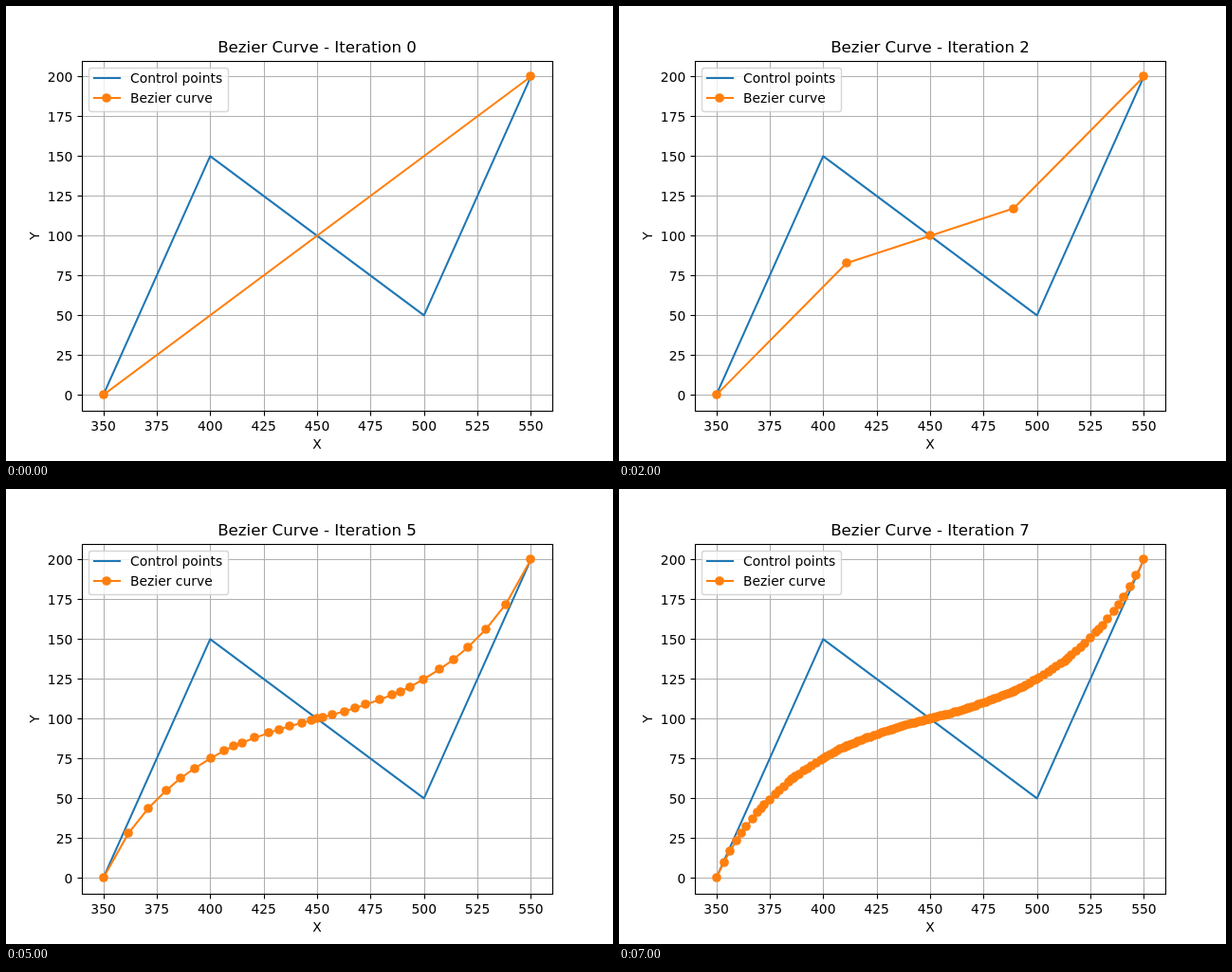
These frames come from a looping animation (640x480 px, 8000 ms). An HTML page with a canvas:

```html
<!DOCTYPE html>
<html lang="en">
<head>
<meta charset="utf-8">
<title>Bezier Curve</title>
<style>
  html, body { margin: 0; width: 100%; height: 100%; overflow: hidden; background: #fff; }
  canvas { display: block; }
</style>
</head>
<body>
<canvas id="stage" width="640" height="480"></canvas>
<script>
const ctx = document.getElementById('stage').getContext('2d');

const PT = 100 / 72;
const BLUE = '#1f77b4', ORANGE = '#ff7f0e', GRID = '#b0b0b0';
const AXES = { left: 80.5, right: 576.5, top: 58.5, bottom: 427.5 };
const CONTROL = [[350, 0], [400, 150], [500, 50], [550, 200]];
const STEPS = 8, STEP_MS = 1000;

const toX = x => 80 + (x - 340) * 496 / 220;
const toY = y => 427.2 - (y + 10) * 1.68;
const snap = v => Math.round(v) + 0.5;
const project = ([x, y]) => [toX(x), toY(y)];
const ticks = start => Array.from({ length: 9 }, (_, i) => start + 25 * i);

const midpoints = pts => pts.slice(1).map((p, i) =>
  [(p[0] + pts[i][0]) / 2, (p[1] + pts[i][1]) / 2]);

// Each half keeps the split point twice, so its degree grows by one per level.
function split(pts) {
  const left = [], right = [];
  let level = pts;
  while (level.length) {
    left.push(level[0]);
    right.unshift(level[level.length - 1]);
    level = midpoints(level);
  }
  const mid = right[0];
  return { left: [...left, mid], mid, right: [mid, ...right] };
}

function innerPoints(pts, depth) {
  if (depth === 0) return [];
  const { left, mid, right } = split(pts);
  return [...innerPoints(left, depth - 1), mid, ...innerPoints(right, depth - 1)];
}

const curves = Array.from({ length: STEPS }, (_, depth) =>
  [CONTROL[0], ...innerPoints(CONTROL, depth), CONTROL[3]].map(project));
const controlLine = CONTROL.map(project);

function line(pts, color, width, cap = 'butt') {
  ctx.beginPath();
  pts.forEach(([x, y]) => ctx.lineTo(x, y));
  ctx.strokeStyle = color;
  ctx.lineWidth = width * PT;
  ctx.lineCap = cap;
  ctx.lineJoin = 'round';
  ctx.stroke();
}

function marker([x, y]) {
  ctx.beginPath();
  ctx.arc(Math.round(x), Math.round(y), 3.5 * PT, 0, 2 * Math.PI);
  ctx.fillStyle = ORANGE;
  ctx.fill();
}

function text(str, x, y, align = 'center', size = 10) {
  ctx.font = `${size * PT}px "DejaVu Sans", sans-serif`;
  ctx.textAlign = align;
  ctx.fillStyle = '#000';
  ctx.fillText(str, x, y);
}

function drawGrid() {
  for (const v of ticks(350)) {
    const x = snap(toX(v));
    line([[x, AXES.top], [x, AXES.bottom]], GRID, 0.8, 'square');
  }
  for (const v of ticks(0)) {
    const y = snap(toY(v));
    line([[AXES.left, y], [AXES.right, y]], GRID, 0.8, 'square');
  }
}

function drawAxes() {
  const { left, right, top, bottom } = AXES;
  for (const v of ticks(350)) {
    const x = snap(toX(v));
    line([[x, bottom], [x, bottom + 5]], '#000', 0.8);
    text(v, toX(v), 448);
  }
  for (const v of ticks(0)) {
    const y = snap(toY(v));
    line([[left - 5, y], [left, y]], '#000', 0.8);
    text(v, 70.3, y + 5, 'right');
  }
  ctx.strokeStyle = '#000';
  ctx.lineWidth = 0.8 * PT;
  ctx.lineJoin = 'miter';
  ctx.strokeRect(left, top, right - left, bottom - top);
  text('X', 328, 467);
  ctx.save();
  ctx.translate(35, 242.4);
  ctx.rotate(-Math.PI / 2);
  text('Y', 0, 0);
  ctx.restore();
}

function drawLegend() {
  ctx.beginPath();
  ctx.roundRect(87.5, 65.5, 147, 46, 2.8);
  ctx.fillStyle = 'rgba(255,255,255,0.8)';
  ctx.fill();
  ctx.strokeStyle = 'rgba(204,204,204,0.8)';
  ctx.lineWidth = PT;
  ctx.stroke();
  line([[93, 76], [120, 76]], BLUE, 1.5, 'square');
  line([[93, 97], [120, 97]], ORANGE, 1.5, 'square');
  marker([106, 97]);
  text('Control points', 131, 81, 'left');
  text('Bezier curve', 131, 102, 'left');
}

function draw(step) {
  ctx.fillStyle = '#fff';
  ctx.fillRect(0, 0, 640, 480);
  drawGrid();
  line(controlLine, BLUE, 1.5, 'square');
  line(curves[step], ORANGE, 1.5, 'square');
  curves[step].forEach(marker);
  drawAxes();
  text(`Bezier Curve - Iteration ${step}`, 328, 49, 'center', 12);
  drawLegend();
}

function frame() {
  draw(Math.floor(performance.now() / STEP_MS) % STEPS);
  requestAnimationFrame(frame);
}
frame();
</script>
</body>
</html>
```
